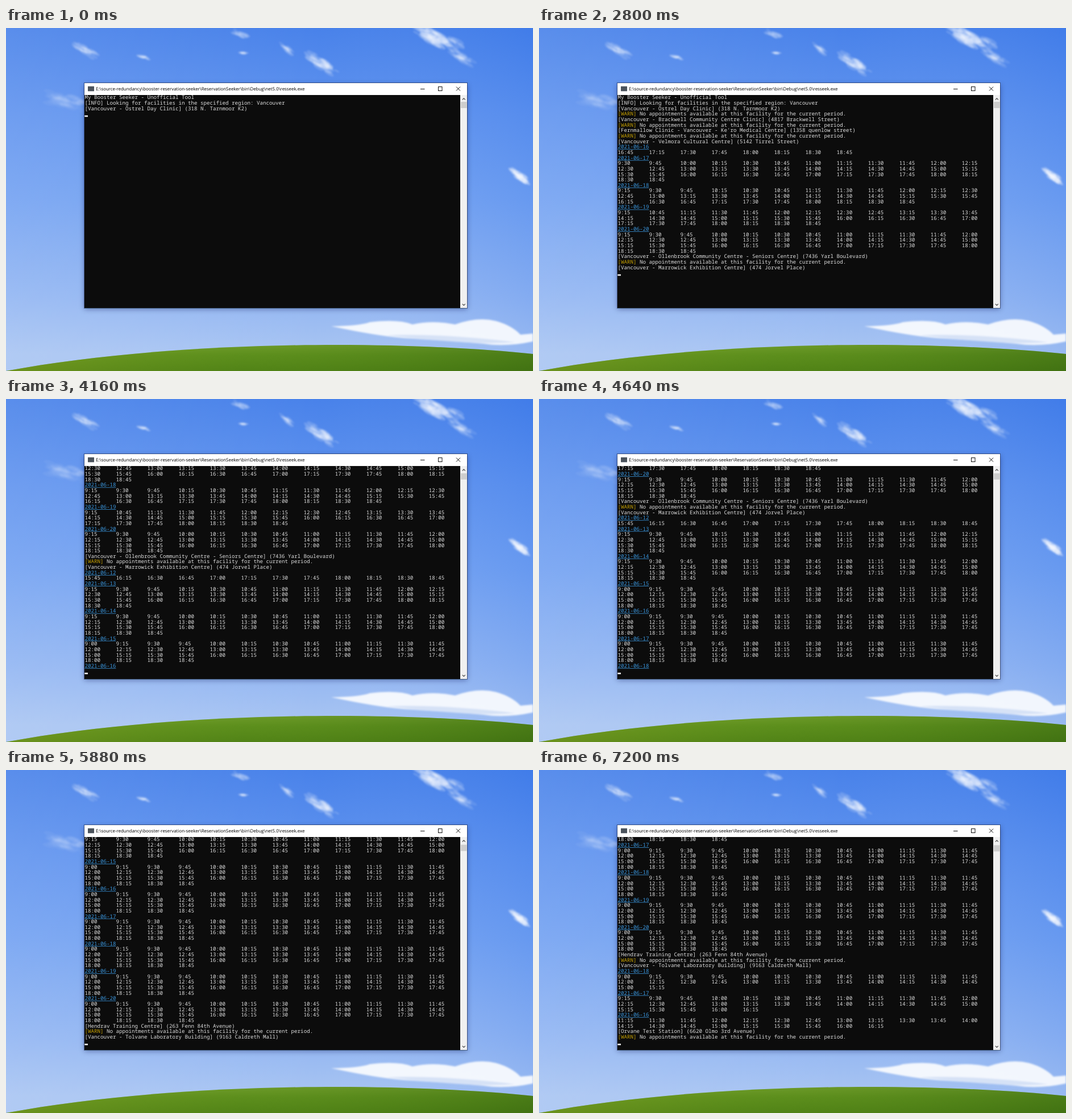
Write an HTML page that moves like this. It is 927x604 px and loops after 7.24 s.

```html
<!DOCTYPE html>
<html lang="en">
<head>
<meta charset="utf-8">
<title>Console</title>
<style>
  html, body { margin: 0; width: 100%; height: 100%; overflow: hidden; background: #6d9df0; }
  svg { display: block; width: 927px; height: 604px; }
  text { text-rendering: geometricPrecision; white-space: pre; }
  .caption { font: 7.9px "Open Sans", "Noto Sans", sans-serif; fill: #000; }
  #rows { font: 9.18px "Noto Sans Mono", "DejaVu Sans Mono", monospace; fill: #dedede; }
  #rows .warn { fill: #c8a200; }
  #rows .date { fill: #3a96dd; }
</style>
</head>
<body>
<svg viewBox="0 0 927 604" xmlns="http://www.w3.org/2000/svg">
  <defs>
    <linearGradient id="sky" x1="0" y1="0" x2="0" y2="1">
      <stop offset="0" stop-color="#437ee9"/>
      <stop offset=".25" stop-color="#5b90ee"/>
      <stop offset=".5" stop-color="#6f9ff1"/>
      <stop offset=".78" stop-color="#8eb3f2"/>
      <stop offset=".95" stop-color="#a6c3f2"/>
    </linearGradient>
    <linearGradient id="haze">
      <stop offset="0" stop-color="#fff" stop-opacity=".12"/>
      <stop offset=".6" stop-color="#fff" stop-opacity=".03"/>
      <stop offset="1" stop-color="#2f6fe8" stop-opacity=".12"/>
    </linearGradient>
    <linearGradient id="grass" x1="0" y1="0" x2="0" y2="1">
      <stop offset="0" stop-color="#6c9a2a"/>
      <stop offset=".4" stop-color="#598c1c"/>
      <stop offset="1" stop-color="#4c7f15"/>
    </linearGradient>
    <linearGradient id="shade">
      <stop offset="0" stop-color="#9cb02a" stop-opacity=".4"/>
      <stop offset=".45" stop-color="#6f9c20" stop-opacity=".15"/>
      <stop offset="1" stop-color="#2c5a0c" stop-opacity=".35"/>
    </linearGradient>
    <filter id="soft" x="-10%" y="-40%" width="120%" height="180%"><feGaussianBlur stdDeviation="1.8"/></filter>
    <filter id="drop" x="-5%" y="-5%" width="110%" height="115%"><feGaussianBlur stdDeviation="5"/></filter>
    <path id="mound" d="M0 604 C180 570 400 558 580 558 C720 558 840 565 927 574 V604 Z"/>
    <clipPath id="pane"><rect x="138" y="118" width="661" height="375"/></clipPath>
  </defs>

  <rect width="927" height="604" fill="url(#sky)"/>
  <rect width="927" height="604" fill="url(#haze)"/>
  <g id="clouds" fill="#fff" filter="url(#soft)"></g>
  <g filter="url(#soft)">
    <path fill="#fff" fill-opacity=".88" d="M572 525 Q620 525 640 518 Q690 512 715 522 Q750 514 790 522 Q830 508 862 516 Q890 524 905 540 L927 538 V552 Q880 562 840 556 Q760 550 700 546 Q650 542 572 525 Z"/>
    <path fill="#b9cdef" fill-opacity=".5" d="M670 541 Q760 537 895 553 Q830 560 670 541 Z"/>
  </g>
  <use href="#mound" fill="url(#grass)"/>
  <use href="#mound" fill="url(#shade)"/>

  <rect x="138" y="100" width="673" height="395" fill="#0a1c48" fill-opacity=".4" filter="url(#drop)"/>
  <rect x="137.5" y="96.5" width="674" height="397" fill="none" stroke="#14223f" stroke-opacity=".55"/>
  <rect x="138" y="97" width="673" height="396" fill="#fff"/>
  <rect x="144" y="102.7" width="11" height="8.6" fill="#4b535c"/>
  <text class="caption" x="158" y="110.2">E:\source-redundancy\booster-reservation-seeker\ReservationSeeker\bin\Debug\net5.0\resseek.exe</text>
  <g fill="none" stroke="#111">
    <path d="M729 107.5h7.5"/>
    <rect x="760.5" y="103.5" width="6.5" height="7"/>
    <path d="M792 103.5l7 7m0 -7l-7 7"/>
  </g>
  <rect x="138" y="118" width="661" height="375" fill="#0c0c0c"/>
  <rect x="799" y="118" width="12" height="375" fill="#f0f0f0"/>
  <rect id="thumb" x="800" width="10.5" height="11" fill="#cdcdcd"/>
  <path d="M802.8 126.3l2.5 -2.5l2.5 2.5M802.8 485.8l2.5 2.5l2.5 -2.5" fill="none" stroke="#444" stroke-width="1.2"/>
  <g clip-path="url(#pane)">
    <g id="rows"></g>
    <rect id="cursor" x="138.3" width="5.7" height="2.6" fill="#f2f2f2"/>
  </g>
</svg>
<script>
const NS = 'http://www.w3.org/2000/svg';
const LOOP = 7240, TICK = 40, REPLY = 264;
const LEFT = 138.4, BASE = 125.4, PITCH = 9.65, MAX_ROWS = 37;
const byId = id => document.getElementById(id);

function add(parent, tag, attrs, text) {
  const el = document.createElementNS(NS, tag);
  for (const k in attrs) el.setAttribute(k, attrs[k]);
  if (text) el.textContent = text;
  parent.append(el);
  return el;
}

// Clouds: faint random puffs, densest at the middle of a tilted line
let seed = 11;
const rnd = () => (seed = seed * 16807 % 2147483647) / 2147483647;
const spread = () => rnd() + rnd() - 1;

function cloud(x, y, length, tilt, opacity) {
  const g = add(byId('clouds'), 'g', { transform: `translate(${x} ${y}) rotate(${tilt})`, 'fill-opacity': opacity });
  for (let i = 0; i < length; i++) {
    const rx = 3 + rnd() * length / 8;
    add(g, 'ellipse', { cx: spread() * length / 2, cy: spread() * length / 6, rx, ry: rx / 3 });
  }
}
cloud(139, 38, 46, 32, .14);
cloud(243, 51, 22, 15, .16);
cloud(413, 11, 32, 20, .13);
cloud(417, 44, 16, 0, .16);
cloud(495, 38, 32, 40, .12);
cloud(555, 63, 64, 30, .16);
cloud(758, 18, 96, 28, .16);
cloud(800, 52, 52, 25, .1);
cloud(905, 262, 44, 38, .3);
cloud(108, 129, 80, 12, .05);

// Console log; each stop waits for a reply before more lines arrive
const log = [], stops = [];
let due = -REPLY;
const pause = ms => { due += ms; };
const say = text => log.push({ text });
const warn = () => log.push({ tag: '[WARN]', text: ' No appointments available at this facility for the current period.' });

function stop() {
  due += REPLY;
  stops.push({ at: Math.round(due / TICK) * TICK, count: log.length });
}

function facility(name, street) {
  say(`[${name}] (${street})`);
  stop();
}

const minutes = s => { const [h, m] = s.split(':'); return h * 60 + +m; };
const clock = m => `${Math.floor(m / 60)}:${String(m % 60).padStart(2, '0')}`;

// One day: its date, then the quarter hours of all ranges, twelve to a line
function day(d, ranges) {
  log.push({ date: `2021-06-${d}` });
  stop();
  const slots = [];
  for (const range of ranges.split(' ')) {
    const [from, to = from] = range.split('-');
    for (let m = minutes(from); m <= minutes(to); m += 15) slots.push(clock(m).padEnd(10));
  }
  while (slots.length) say(slots.splice(0, 12).join('').trimEnd());
}

function fullDays(first, last) {
  for (let d = first; d <= last; d++) day(d, '9:00-18:45');
}

say('My Booster Seeker - Unofficial Tool');
say('[INFO] Looking for facilities in the specified region: Vancouver');
facility('Vancouver - Ostrel Day Clinic', '318 N. Tarnmoor K2');
warn();
facility('Vancouver - Brackwell Community Centre Clinic', '4817 Brackwell Street');
warn();
facility("Fernmallow Clinic - Vancouver - Ke'ro Medical Centre", '1358 quenlow street');
warn();
facility('Vancouver - Velmora Cultural Centre', '5142 Tirrel Street');
pause(141);
day(16, '16:45 17:15-18:45');
day(17, '9:30-18:45');
day(18, '9:15-9:45 10:15-10:45 11:15-14:45 15:15-15:45 16:15-16:45 17:15-18:45');
day(19, '9:15 10:45 11:15-12:45 13:15-13:45 14:15-18:45');
day(20, '9:15-18:45');
facility('Vancouver - Ollenbrook Community Centre - Seniors Centre', '7436 Yarl Boulevard');
warn();
facility('Vancouver - Marrowick Exhibition Centre', '474 Jorvel Place');
day(12, '15:45 16:15-18:45');
day(13, '9:15-9:45 10:15-18:45');
day(14, '9:15-18:45');
fullDays(15, 18);
pause(70);
fullDays(19, 20);
pause(130);
facility('Hendrav Training Centre', '263 Fenn 84th Avenue');
warn();
facility('Vancouver - Tolvane Laboratory Building', '9163 Caldreth Mall');
day(18, '9:00-15:15');
day(17, '9:15-16:15');
day(16, '11:15-16:15');
facility('Orvane Test Station', '6620 Olmo 3rd Avenue');
warn();
stop();

function print(count) {
  const rows = byId('rows'), top = Math.max(0, count - MAX_ROWS);
  rows.replaceChildren();
  log.slice(top, count).forEach((line, i) => {
    const y = BASE + i * PITCH;
    const row = add(rows, 'text', { x: LEFT, y });
    if (line.tag) add(row, 'tspan', { class: 'warn' }, line.tag);
    if (line.text) add(row, 'tspan', {}, line.text);
    if (line.date) {
      add(row, 'tspan', { class: 'date' }, line.date);
      add(rows, 'rect', { class: 'date', x: LEFT, y: y + 1.1, width: 55, height: .8 });
    }
  });
  byId('cursor').setAttribute('y', BASE + (count - top) * PITCH - .5);
  byId('thumb').setAttribute('y', 130 + Math.round(top / 18.5) * .8);
}

let shown = -1;
function frame() {
  const t = performance.now() % LOOP;
  const { count } = stops.filter(s => s.at <= t).pop();
  if (count !== shown) print(shown = count);
  requestAnimationFrame(frame);
}
frame();
</script>
</body>
</html>
```
